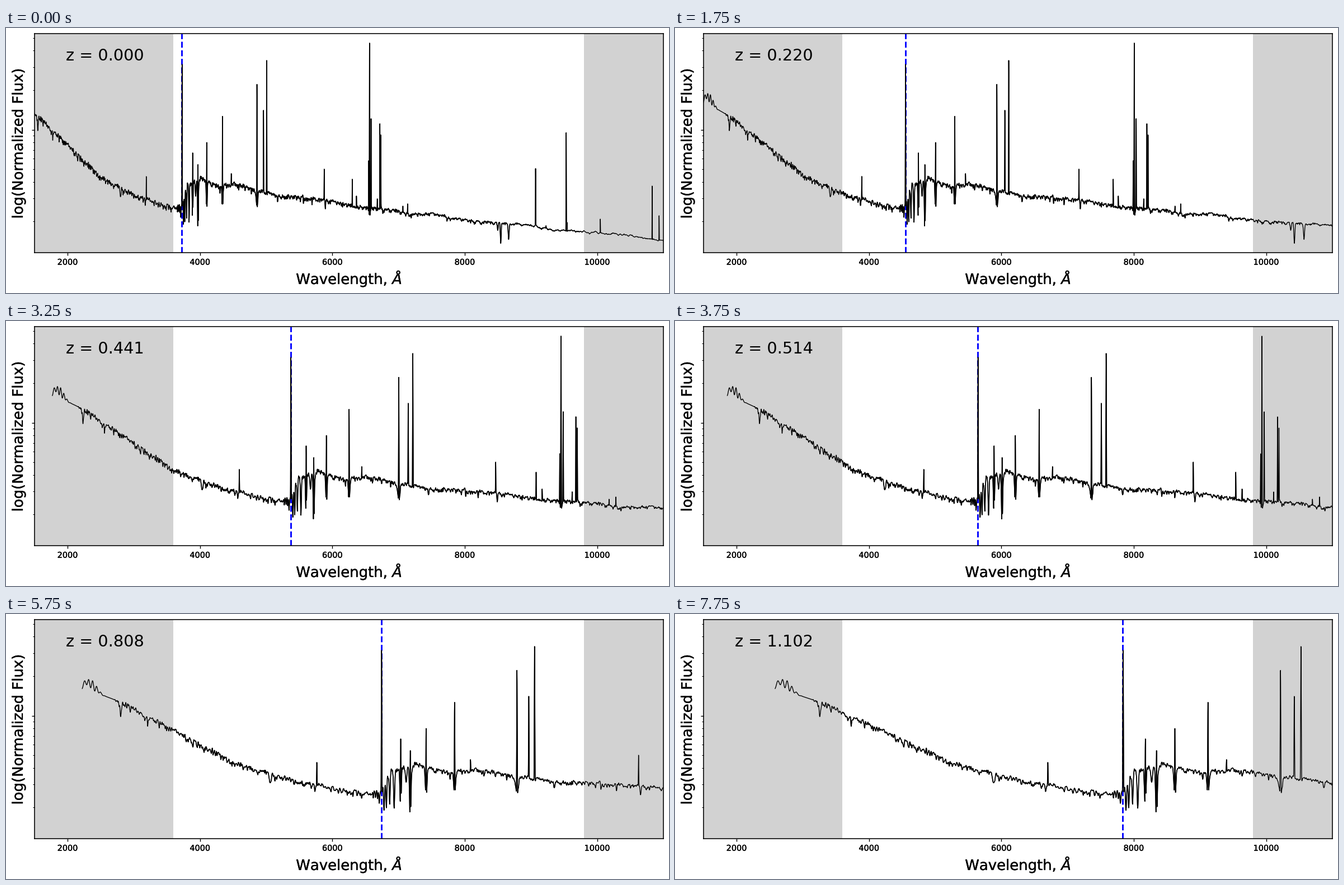
Write a matplotlib script that moves like this. It is 1185 by 473 pixels and loops after 8 s.

```python
import numpy as np
import matplotlib.pyplot as plt
from matplotlib import patheffects
from matplotlib.animation import FuncAnimation

# At 72 dpi one point is one pixel, so all sizes below are pixels.
W, H, DPI = 1185, 473, 72
LEFT, RIGHT, TOP, BOTTOM = 51, 1175, 10, 401
SCALE = 1.44                       # enlargement of text and lines
UNIT_Y, DECADE = 181.5, 234.2      # height of flux = 1, pixels per decade
BLUE_CUT, RED_CUT = 3600, 9800     # observable window
OII = 3727
Z_STEP = 1.8 / 49
FRAMES, INTERVAL = 32, 250

plt.rcParams["font.family"] = "DejaVu Sans"

# Key points of the continuum: rest wavelength -> height on the stage
CONTINUUM = {
    1228: 134, 1242: 121, 1300: 124, 1400: 145, 1522: 155, 2000: 210,
    2500: 267, 3000: 300, 3640: 323, 3727: 325, 3800: 280, 4010: 269,
    4250: 282, 4500: 279, 5150: 300, 5900: 307, 6300: 318, 6950: 326,
    7150: 334, 7500: 332, 8000: 344, 9050: 353, 9300: 360, 10300: 367,
    11000: 380,
}
# Metal absorption lines: wavelength -> depth
METALS = {1549: 22, 2800: 15, 3934: 30, 3968: 30, 4304: 9, 5175: 10,
          5893: 12, 8498: 14, 8542: 33, 8662: 29}
# Helium and forbidden emission lines: wavelength -> height of the peak
EMISSION = {3188: 265, 3729: 65, 3889: 223, 4472: 260, 4959: 147, 5007: 58,
            5876: 252, 6300: 270, 6363: 300, 6548: 237, 6584: 162, 6678: 305,
            6717: 171, 6731: 191, 7065: 318, 7136: 314, 9069: 251, 9531: 187,
            10830: 282}


def bell(x, center, width):
    return np.exp(-0.5 * ((x - center) / width) ** 2)


def hydrogen(lower, upper):
    return round(911.27 * lower**2 * upper**2 / (upper**2 - lower**2))


def smooth(values, width):
    reach = int(4 * width)
    kernel = bell(np.arange(-reach, reach + 1), 0, width)
    padded = np.pad(values, reach, mode="edge")
    return np.convolve(padded, kernel / kernel.sum(), mode="valid")


def grain(rng, size, width):
    noise = smooth(rng.normal(size=size), width)
    noise /= noise.std()
    return noise + 0.12 * (noise ** 2 - 1)   # dips reach a little further


def to_flux(y):
    return 10 ** ((UNIT_Y - y) / DECADE)


def to_height(flux):
    return UNIT_Y - DECADE * np.log10(flux)


def make_spectrum():
    rng = np.random.default_rng(12)
    wave = np.arange(1228, 11001)
    y = smooth(np.interp(wave, list(CONTINUUM), list(CONTINUUM.values())), 5)
    y -= 8 * np.cos(2 * np.pi * (wave - 1281) / 34) * bell(wave, 1310, 40)

    fine = np.interp(wave, [1490, 1530, 3500, 3800, 5400, 8400, 9300],
                     [0, 3.2, 2.6, 2.4, 2.2, 1.0, 0.3])
    fine += 4 * bell(wave, OII, 50)
    y += fine * grain(rng, wave.size, 2.5)
    y += np.where(wave > 1522, 1, 0) * grain(rng, wave.size, 11)

    for center, depth in METALS.items():
        y += depth * bell(wave, center, 6)
    for n in range(3, 13):
        y += 75 * bell(n, 8, 3) * bell(wave, hydrogen(2, n), 1 + 32 / n)

    peaks = dict(EMISSION)
    for n in range(3, 8):
        peaks[hydrogen(2, n)] = 27 + 256 * np.log(n / 3)
    for n in range(6, 10):
        peaks[hydrogen(3, n)] = 335 + 6 * (n - 6)

    flux = to_flux(y)
    for center, peak in peaks.items():
        rise = to_flux(peak) - flux[center - wave[0]]
        flux += max(rise, 0) * bell(wave, center, 1.5)
    return wave, to_height(flux)


def thicken(text, width):
    text.set_path_effects(
        [patheffects.withStroke(linewidth=width, foreground="black")])


fig = plt.figure(figsize=(W / DPI, H / DPI), dpi=DPI, facecolor="white")
ax = fig.add_axes([LEFT / W, 1 - BOTTOM / H,
                   (RIGHT - LEFT) / W, (BOTTOM - TOP) / H])
ax.set_xlim(1500, 11000)
ax.set_ylim(BOTTOM, TOP)
ax.set_xticks(range(2000, 10001, 2000))
ax.set_yticks([UNIT_Y], labels=[""])
steps = np.arange(2, 10)
ax.set_yticks(to_height(np.append(steps / 10, steps[:4])), minor=True)
ax.tick_params(length=3.5 * SCALE, width=1.4, labelsize=10 * SCALE, pad=5.5)
ax.tick_params(which="minor", length=2 * SCALE, width=1)
for spine in ax.spines.values():
    spine.set_linewidth(1.6)
for label in ax.get_xticklabels():
    thicken(label, 0.35)

for start, end in ((1500, BLUE_CUT), (RED_CUT, 11000)):
    ax.axvspan(start, end, color="#d2d2d2", lw=0, zorder=0)

axis_label = dict(size=18 * SCALE, ha="center", va="baseline")
thicken(fig.text(613 / W, 1 - 457 / H, r"Wavelength, $\AA$", **axis_label),
        0.35)
thicken(fig.text(30 / W, 1 - 206.5 / H, "log(Normalized Flux)", rotation=90,
                 rotation_mode="anchor", **axis_label), 0.35)
z_text = ax.text(0.05, (BOTTOM - 58) / (BOTTOM - TOP), "", size=20 * SCALE,
                 transform=ax.transAxes)

rest, height = make_spectrum()
marker = ax.axvline(OII, color="blue", ls="--", lw=2 * SCALE)
full, = ax.plot([], [], color="black", lw=1.35)
inside, = ax.plot([], [], color="black", lw=1.6)


def update(i):
    z = max(i - 1, 0) * Z_STEP
    wave = rest * (1 + z)
    seen = (wave > BLUE_CUT) & (wave < RED_CUT)
    full.set_data(wave, height)
    inside.set_data(wave[seen], height[seen])
    marker.set_xdata([OII * (1 + z)] * 2)
    z_text.set_text(f"z = {z:.3f}")
    return full, inside, marker, z_text


anim = FuncAnimation(fig, update, frames=FRAMES, interval=INTERVAL,
                     repeat=True, repeat_delay=0)
plt.show()
```
